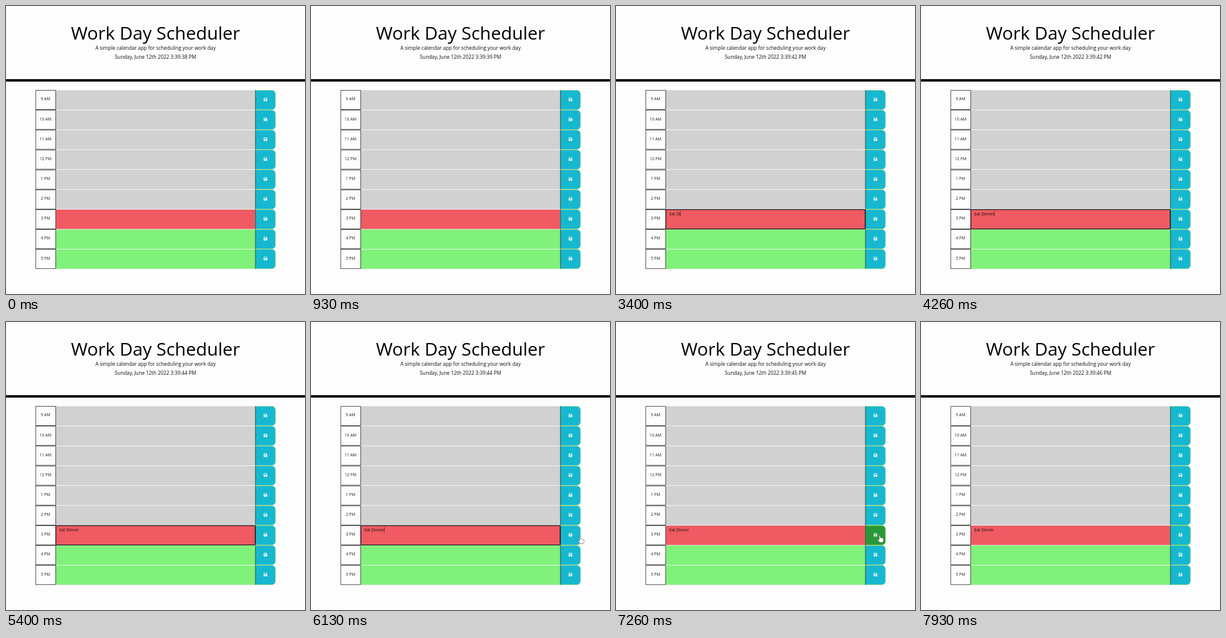
Recreate the animation shown at these times as an HTML page with a canvas. Size 496 px wide and 480 px high, loop 8000 ms.

```html
<!DOCTYPE html>
<html lang="en">
<head>
<meta charset="utf-8">
<title>Work Day Scheduler</title>
<style>
html, body { margin: 0; width: 100%; height: 100%; overflow: hidden; background: #fdfdfd; }
canvas { display: block; width: 496px; height: 480px; }
</style>
</head>
<body>
<canvas id="stage"></canvas>
<script>
const W = 496, H = 480, LOOP = 8000;
const canvas = document.getElementById('stage');
const ctx = canvas.getContext('2d');
const dpr = window.devicePixelRatio || 1;
canvas.width = W * dpr;
canvas.height = H * dpr;

const FONT = '"Open Sans", "Noto Sans", sans-serif';
const SMALL = 6.63;
const TOP = 140, ROW = 33.15;
const LEFT = 49.3, FIELD = 82.4, SAVE = 413.8, RIGHT = 447;
const HOURS = ['9 AM', '10 AM', '11 AM', '12 PM', '1 PM', '2 PM', '3 PM', '4 PM', '5 PM'];
const NOW = 6;
const BLUE = [22, 184, 208], GREEN = [40, 152, 56];

const FOCUS = 2000, CLICK = 6900;
const ENTER = 6000, HOVER = 6200, LEAVE = 7600;
const ENTRY = 'Eat Dinner';
const KEYS = [2650, 2780, 2900, 3010, 3170, 3330, 3450, 3560, 3680, 3800];

const clamp = v => Math.max(0, Math.min(1, v));
const ease = v => 1 - Math.pow(1 - clamp(v), 3);

function text(str, x, y, size, align = 'center', color = '#111') {
  ctx.font = `400 ${size}px ${FONT}`;
  ctx.textAlign = align;
  ctx.fillStyle = color;
  ctx.fillText(str, x, y);
}

function box(x, y, w, h, color) {
  ctx.fillStyle = color;
  ctx.fillRect(x, y, w, h);
}

function shape(points, fill, stroke, width) {
  ctx.beginPath();
  points.forEach(([x, y]) => ctx.lineTo(x, y));
  ctx.closePath();
  ctx.lineWidth = width;
  ctx.lineJoin = 'round';
  ctx.fillStyle = fill;
  ctx.fill();
  ctx.strokeStyle = stroke;
  ctx.stroke();
}

function header(t) {
  // The clock ticks 400 ms into each second of the loop.
  const second = 38 + Math.floor((t + 600) / 1000);
  text('Work Day Scheduler', 248, 56, 29.85, 'center', '#000');
  text('A simple calendar app for scheduling your work day', 248, 73, 8.29);
  text(`Sunday, June 12th 2022 3:39:${second} PM`, 248, 87.6, 8.29);
  box(0, 121.9, W, 4.1, '#000');
}

function saveIcon(x, y) {
  ctx.beginPath();
  ctx.moveTo(x - 2.3, y - 2.9);
  ctx.lineTo(x + 1.5, y - 2.9);
  ctx.lineTo(x + 2.9, y - 1.5);
  ctx.lineTo(x + 2.9, y + 2.3);
  ctx.quadraticCurveTo(x + 2.9, y + 2.9, x + 2.3, y + 2.9);
  ctx.lineTo(x - 2.3, y + 2.9);
  ctx.quadraticCurveTo(x - 2.9, y + 2.9, x - 2.9, y + 2.3);
  ctx.lineTo(x - 2.9, y - 2.3);
  ctx.quadraticCurveTo(x - 2.9, y - 2.9, x - 2.3, y - 2.9);
  ctx.rect(x - 2.1, y - 2.1, 3.6, 1.6);
  ctx.moveTo(x + 0.85, y + 1.2);
  ctx.arc(x, y + 1.2, 0.85, 0, Math.PI * 2);
  ctx.fillStyle = '#fff';
  ctx.fill('evenodd');
}

function saveButton(y, hover, focused) {
  const color = BLUE.map((c, i) => Math.round(c + (GREEN[i] - c) * hover));
  ctx.beginPath();
  ctx.roundRect(SAVE, y + 0.4, RIGHT - SAVE, ROW - 0.8, [0, 6, 6, 0]);
  ctx.fillStyle = `rgb(${color})`;
  ctx.fill();
  ctx.lineWidth = focused ? 0.9 : 0.6;
  ctx.strokeStyle = focused ? '#7fd24a' : '#a5d860';
  ctx.stroke();
  box(SAVE - 0.3, y + 0.4, 0.8, ROW - 0.6, '#123');
  saveIcon(430.4, y + 15.7);
}

function row(i, hover, focused) {
  const y = TOP + i * ROW;
  const color = i < NOW ? '#d1d1d1' : i === NOW ? '#f05a62' : '#80f17b';
  box(FIELD, y + 0.4, SAVE - FIELD, ROW - 0.8, color);
  ctx.lineWidth = 0.8;
  ctx.strokeStyle = '#222';
  ctx.strokeRect(LEFT, y + 0.6, FIELD - LEFT, ROW - 1.2);
  text(HOURS[i], 65.6, y + 17.4, SMALL, 'center', '#222');
  saveButton(y, hover, focused);
}

function entry(t) {
  const y = TOP + NOW * ROW;
  const typed = ENTRY.slice(0, KEYS.filter(k => k <= t).length);
  text(typed, 88.5, y + 10, SMALL, 'left', '#111');
  if (t < FOCUS || t >= CLICK) return;

  ctx.beginPath();
  ctx.roundRect(FIELD + 0.2, y + 0.4, SAVE - FIELD - 0.6, ROW - 0.8, 1.5);
  ctx.lineWidth = 1.3;
  ctx.strokeStyle = '#101010';
  ctx.stroke();

  const since = t - Math.max(FOCUS, ...KEYS.filter(k => k <= t));
  if (Math.floor(since / 530) % 2 === 0) {
    const x = 88.5 + ctx.measureText(typed).width;
    box(x, y + 3, 0.7, 9, '#111');
  }
}

function arrow(x, y) {
  const pts = [[0, 0], [0, 11], [2.6, 8.6], [4.3, 12.2], [6, 11.4], [4.4, 8], [7.8, 7.8]];
  shape(pts.map(([a, b]) => [x + a, y + b]), '#fff', '#222', 0.6);
}

function hand(x, y) {
  ctx.save();
  ctx.translate(x, y);
  ctx.beginPath();
  ctx.moveTo(-1, 1);
  ctx.quadraticCurveTo(0, -0.6, 1, 1);
  ctx.lineTo(1.2, 4.3);
  ctx.quadraticCurveTo(2.2, 3.6, 3, 4.7);
  ctx.quadraticCurveTo(4.2, 4.1, 4.8, 5.3);
  ctx.quadraticCurveTo(6.4, 5, 6.4, 6.5);
  ctx.lineTo(6.2, 9);
  ctx.lineTo(5, 12.2);
  ctx.lineTo(-0.4, 12.2);
  ctx.lineTo(-3.2, 8.2);
  ctx.quadraticCurveTo(-3.6, 6.6, -2.2, 6.8);
  ctx.lineTo(-1, 8);
  ctx.closePath();
  ctx.fillStyle = '#fff';
  ctx.fill();
  ctx.lineWidth = 0.5;
  ctx.strokeStyle = '#222';
  ctx.stroke();
  ctx.restore();
}

function pointer(t) {
  if (t < ENTER || t >= LEAVE) return;
  const k = ease((t - ENTER) / 450);
  const x = 463 - 25.5 * k, y = 361 - 5.8 * k;
  (x > RIGHT ? arrow : hand)(x, y);
}

function draw(t) {
  ctx.setTransform(dpr, 0, 0, dpr, 0, 0);
  box(0, 0, W, H, '#fdfdfd');
  header(t);
  const hover = clamp((t - HOVER) / 150) - clamp((t - LEAVE) / 150);
  HOURS.forEach((_, i) => row(i, i === NOW ? hover : 0, i === NOW && t >= CLICK));
  entry(t);
  pointer(t);
}

const start = performance.now();
function tick() {
  draw((performance.now() - start) % LOOP);
  requestAnimationFrame(tick);
}
tick();
</script>
</body>
</html>
```
